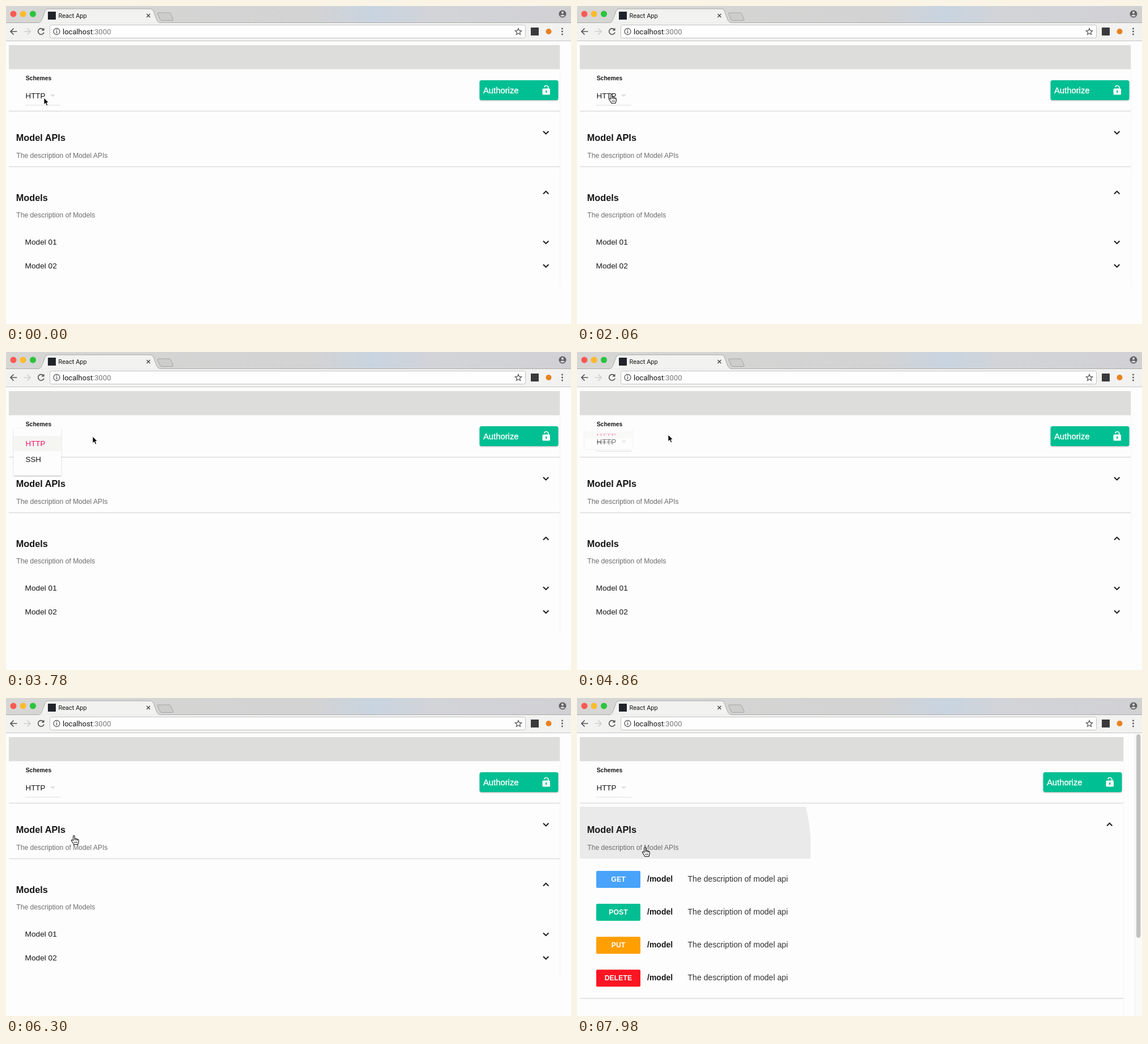
Write an HTML page that moves like this. It is 998 px wide and 561 px high and loops after 8 s.

```html
<!DOCTYPE html>
<html lang="en">
<head>
<meta charset="utf-8">
<title>React App</title>
<style>
  html, body { margin: 0; width: 100%; height: 100%; overflow: hidden; background: #fdfdfe; }
  svg { display: block; width: 998px; height: 561px; }
  text { font-family: "Liberation Sans", Arial, sans-serif; fill: #161616; white-space: pre; }
  .ui { font-family: Roboto, sans-serif; }
  .b { font-weight: 700; }
  .soft { fill: #6d6d6d; }
  .mid { text-anchor: middle; fill: #fff; }
  .chev { fill: none; stroke: #1b1b1b; stroke-width: 2; }
  .rule { stroke: #dcdcdc; stroke-width: 1.4; }
</style>
</head>
<body>
<svg viewBox="0 0 998 561">
  <defs>
    <linearGradient id="strip">
      <stop offset="0" stop-color="#d6d6d5"/>
      <stop offset=".54" stop-color="#d3d3d3"/>
      <stop offset=".65" stop-color="#c8d4e0"/>
      <stop offset=".76" stop-color="#d3d4d8"/>
      <stop offset="1" stop-color="#d1d1d4"/>
    </linearGradient>
    <filter id="shade" x="-20%" y="-20%" width="140%" height="150%">
      <feDropShadow dx="0" dy="1" stdDeviation="1.2" flood-opacity=".3"/>
    </filter>
    <clipPath id="panel"><rect x="5" y="192" width="960" height="91.5"/></clipPath>
  </defs>

  <rect width="998" height="561" fill="#fdfdfe"/>

  <g id="browser">
    <rect width="998" height="30" fill="url(#strip)"/>
    <rect y="29.5" width="998" height="32" fill="#f2f2f1"/>
    <path d="M0 29.5H57C62 29 63 25 65 20L69 9Q70.500 5 74 5H255Q259 5 260.500 9L266 24Q268 29 273 29.500H998" fill="#f2f2f1" stroke="#aaa"/>
    <path d="M0 61.500H998" stroke="#c4c4c4"/>
    <path d="M269 12H288Q290 12 291 14L295 23Q296 25.500 293 25.500H275Q273 25.500 272 23L268 14Q267 12 269 12Z" fill="#cdcdcb" stroke="#a4a4a4"/>
    <circle cx="13" cy="14" r="5.500" fill="#fb5952"/>
    <circle cx="30" cy="14" r="5.500" fill="#fcbb2d"/>
    <circle cx="47.500" cy="14" r="5.500" fill="#29c53c"/>
    <rect x="74" y="10" width="14" height="14" fill="#20242a"/>
    <text class="ui" x="92.500" y="21" font-size="11">React App</text>
    <path d="M248.500 14l6 6m0-6l-6 6" stroke="#444" stroke-width="1.400"/>
    <circle cx="983" cy="14" r="6.500" fill="#606062"/>
    <circle cx="983" cy="11.700" r="2.100" fill="#d6d6d8"/>
    <path d="M978.700 17.300Q983 13 987.300 17.300Q983 20 978.700 17.300Z" fill="#d6d6d8"/>

    <g fill="none" stroke="#555" stroke-width="1.700">
      <path d="M19.500 45H8m5.500-5.500L8 45l5.500 5.500"/>
      <path d="M31.500 45H43m-5.500-5.500L43 45l-5.500 5.500" stroke="#cfcfcf"/>
      <path d="M66 41.500A5.300 5.300 0 1 0 67 46.500"/>
      <path d="M67.500 38.500v5h-5z" fill="#555" stroke="none"/>
    </g>
    <rect x="77.500" y="33.500" width="840" height="23" rx="3" fill="#fefefe" stroke="#c2c2c2"/>
    <circle cx="89.500" cy="45" r="5.500" fill="none" stroke="#555" stroke-width="1.300"/>
    <path d="M89.500 44v4m0-6.500v1.400" stroke="#555" stroke-width="1.400"/>
    <text class="ui" x="100" y="49.500" font-size="13">localhost<tspan fill="#777">:3000</tspan></text>
    <path id="star" fill="none" stroke="#555" stroke-width="1.200"/>
    <rect x="927" y="38" width="14" height="14" fill="#3a3a3c"/>
    <circle cx="958.500" cy="45" r="5" fill="#e8821e"/>
    <g fill="#555"><circle cx="982.500" cy="40" r="1.400"/><circle cx="982.500" cy="45" r="1.400"/><circle cx="982.500" cy="50" r="1.400"/></g>
  </g>

  <rect id="bar" x="5" y="69" height="42.500" fill="#dddddb"/>
  <rect id="edge" y="69" width="1" fill="#f4f4ef"/>
  <text class="b" x="34.700" y="131" font-size="10.400">Schemes</text>
  <text x="34.500" y="162.500" font-size="13.400">HTTP</text>
  <path d="M78 156h9l-4.500 4.500z" fill="#dededc"/>
  <path d="M34 175H96" stroke="#dcdcdc"/>
  <path id="topRule" class="rule"/>

  <g id="auth">
    <rect x="836.500" y="131" width="139" height="35" rx="3.500" fill="#02bf93" filter="url(#shade)"/>
    <text x="843" y="154" font-size="14.800" style="fill:#fff;stroke:#fff;stroke-width:.35">Authorize</text>
    <path d="M950.500 146v-2.800a3.700 3.700 0 0 1 7.400 0V146" transform="translate(0 1)" fill="none" stroke="#fff" stroke-width="1.700"/>
    <rect x="947.500" y="145.500" width="13.500" height="11" rx="1.500" fill="#fff"/>
    <rect x="948.800" y="143" width="2.800" height="2.500" fill="#02bf93"/>
    <path d="M954.200 149v4" stroke="#02bf93" stroke-width="2.200"/>
  </g>

  <circle id="ripple" cx="120" cy="263" fill="#eaeaea" clip-path="url(#panel)"/>
  <text class="b" x="17.800" y="238" font-size="16.300">Model APIs</text>
  <text class="soft" x="18.300" y="267.500" font-size="12.150">The description of Model APIs</text>
  <path id="apiChev" class="chev"/>

  <g id="closed">
    <path class="rule" d="M5 283.500H978"/>
    <text class="b" x="17.800" y="344" font-size="16.300">Models</text>
    <text class="soft" x="18.300" y="372.500" font-size="12.150">The description of Models</text>
    <text x="33.500" y="421" font-size="13.700">Model 01</text>
    <text x="33.500" y="462.500" font-size="13.700">Model 02</text>
    <path class="chev" d="M949 331.500l4.700-4.700 4.700 4.700M949 414.500l4.700 4.700 4.700-4.700M949 456l4.700 4.700 4.700-4.700"/>
  </g>

  <g id="opened">
    <g id="routes"></g>
    <path class="rule" d="M5 530H965"/>
    <rect x="985" y="62" width="13" height="499" fill="#fafaf9"/>
    <path d="M985.500 62V561" stroke="#eeeeec"/>
    <rect x="988" y="64" width="7.500" height="359" rx="3.700" fill="#c1c1c1"/>
  </g>

  <g id="menu">
    <rect x="13.500" y="134" width="84" height="84" rx="1.500" fill="#fdfdfe" filter="url(#shade)"/>
    <rect x="13.500" y="148" width="84" height="27" fill="#f5f5f2"/>
    <text x="34.500" y="166" font-size="13.400" style="fill:#ee1465">HTTP</text>
    <text x="34.500" y="194" font-size="13.400">SSH</text>
  </g>

  <circle id="ring" r="25" fill="none" stroke="#0b0b0b" stroke-width="3"/>
  <path id="arrow" d="M0 0V11.800L2.700 9.300 4.700 13.800 6.800 12.900 4.900 8.500H8.500Z" fill="#000" stroke="#fff" stroke-width=".9"/>
  <g id="hand" stroke="#111" stroke-width="1.100" stroke-linejoin="round">
    <path d="M-1.300 8.500V1C-1.300-.9 1.300-.9 1.300 1V5.500C1.700 4.300 3.700 4.600 3.700 6C4.200 5 6 5.400 6 6.800C6.700 6 8.300 6.500 8.300 8V11C8.300 13 7 13.500 7 15.500H-.3C-.6 13.500-4.600 9.300-4.600 8.300C-4.600 6.700-2.500 7-1.300 8.500Z" fill="#fff"/>
    <path d="M1.300 5.500V8M3.700 6V8.400M6 6.800V8.800M1.200 10.500V13M3.200 10.500V13M5.200 10.500V13" fill="none" stroke-width=".9"/>
  </g>
</svg>
<script>
const $ = id => document.getElementById(id);
const set = (id, attrs) => {
  for (const k in attrs) $(id).setAttribute(k, attrs[k]);
};
const show = (id, on) => set(id, { visibility: on ? "visible" : "hidden" });
const clamp = v => Math.min(1, Math.max(0, v));
const phase = (t, from, to) => clamp((t - from) / (to - from));
const smooth = p => p * p * (3 - 2 * p);

const LOOP = 8000, HOVER = 400, OPEN = 2400, CLOSE = 4750, EXPAND = 7840;
const track = [
  [0, 67, 162], [250, 67, 162], [700, 61, 156], [2700, 61, 156],
  [3500, 153, 149], [4000, 153, 149], [4500, 161, 146], [5250, 161, 146],
  [6100, 120, 243], [6700, 120, 243], [7350, 120, 264], [LOOP, 120, 264]
];
const clicks = [[2200, 2400], [4570, 4750], [7660, 7860]];

$("star").setAttribute("d", "M" + Array.from({ length: 10 }, (_, i) => {
  const a = (i / 5 - .5) * Math.PI, r = i % 2 ? 2.7 : 6;
  return `${905 + r * Math.cos(a)} ${45.5 + r * Math.sin(a)}`;
}).join("L") + "Z");

$("routes").innerHTML = [
  ["GET", "#49a3fa"], ["POST", "#02bf93"], ["PUT", "#ff9f02"], ["DELETE", "#fb1522"]
].map(([verb, color], i) => `<g transform="translate(0 ${305 + i * 58.1})">
  <rect x="34" width="78" height="30" rx="2" fill="${color}"/>
  <text class="b mid" x="73" y="19" font-size="12.300">${verb}</text>
  <text class="b" x="124" y="19" font-size="14">/model</text>
  <text x="195.500" y="19" font-size="14.100" style="fill:#333">The description of model api</text>
</g>`).join("");

function pointer(t) {
  const i = track.findIndex(k => t <= k[0]) || 1;
  const [t0, x0, y0] = track[i - 1], [t1, x1, y1] = track[i];
  const p = smooth(phase(t, t0, t1));
  return [x0 + (x1 - x0) * p, y0 + (y1 - y0) * p];
}

function render(t) {
  const [x, y] = pointer(t);
  const at = `translate(${x} ${y})`;
  const hand = t > HOVER && (x < 97 || y > 186);
  set("arrow", { transform: at });
  set("hand", { transform: at });
  show("arrow", !hand);
  show("hand", hand);
  set("ring", { cx: x, cy: y });
  show("ring", clicks.some(([a, b]) => t >= a && t < b));

  const grow = t < CLOSE ? smooth(phase(t, OPEN, OPEN + 220)) : 1 - phase(t, CLOSE, CLOSE + 200);
  show("menu", grow > 0);
  set("menu", { opacity: grow, transform: `translate(0 134) scale(1 ${grow}) translate(0 -134)` });

  // The scrollbar of the expanded page narrows the content by 13px.
  const open = t >= EXPAND, right = open ? 965 : 978, cx = right - 24.5;
  show("closed", !open);
  show("opened", open);
  set("bar", { width: right - 5 });
  set("edge", { x: right, height: open ? 492 : 424 });
  set("topRule", { d: `M5 185.500H${right}` });
  set("auth", { transform: `translate(${right - 978} 0)` });
  set("apiChev", { d: open ? `M${cx - 4.5} 225.500l4.700-4.700 4.700 4.700` : `M${cx - 4.5} 221l4.700 4.700 4.700-4.700` });
  const spread = Math.max(0, t - 7760) / 220;
  set("ripple", { r: 291 * Math.pow(spread, 1.4) });
}

function tick(now) {
  render(now % LOOP);
  requestAnimationFrame(tick);
}
render(0);
requestAnimationFrame(tick);
</script>
</body>
</html>
```
